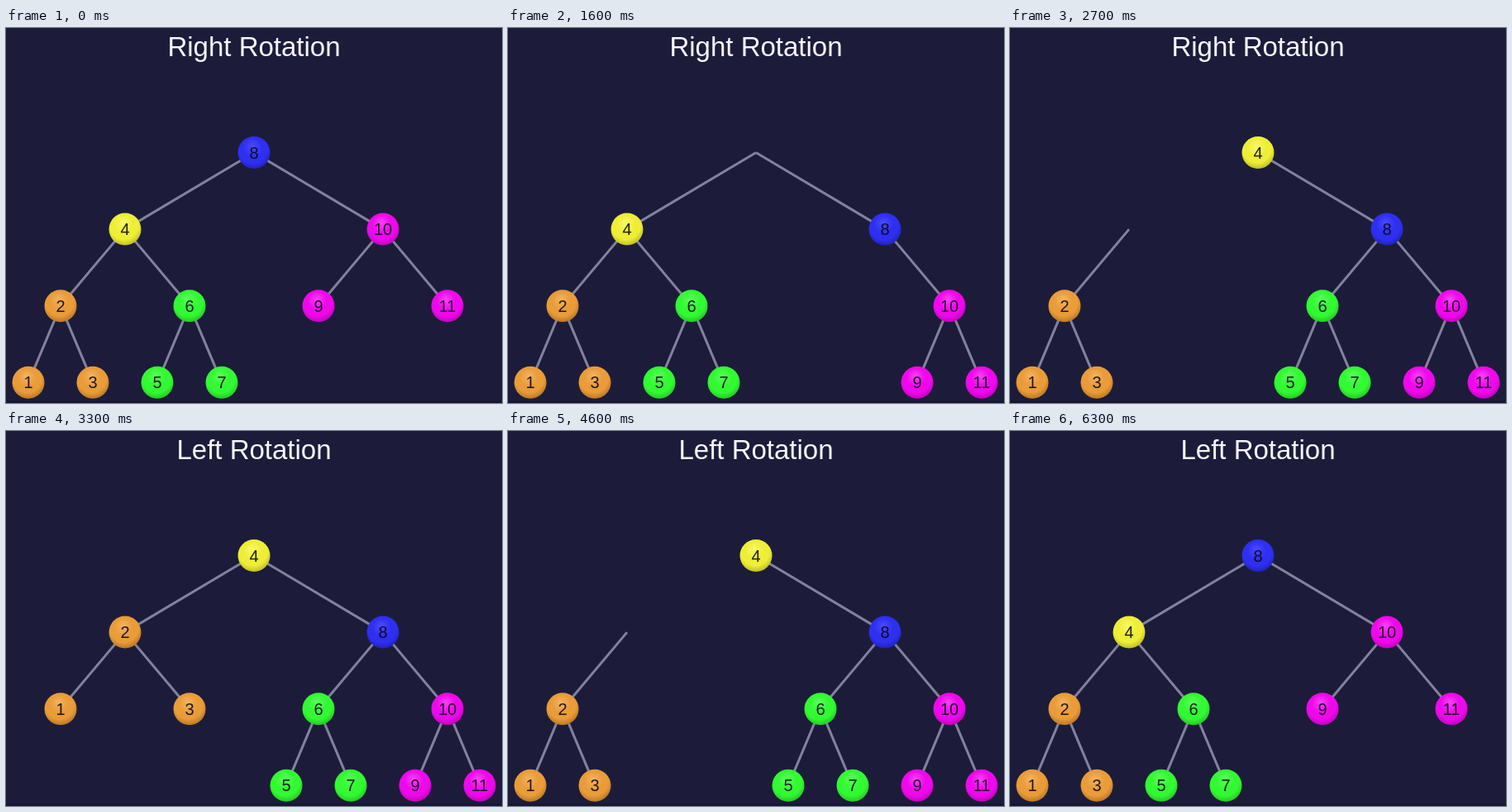
Recreate the animation shown at these times as an HTML page with a canvas. Size 600x453 px, loop 6500 ms.

```html
<!DOCTYPE html>
<html lang="en">
<head>
<meta charset="utf-8">
<title>Tree rotation</title>
<style>
  html, body { margin: 0; width: 100%; height: 100%; overflow: hidden; background: #1c1c3a; }
  canvas { display: block; }
</style>
</head>
<body>
<canvas id="stage" width="600" height="453"></canvas>
<script>
const ctx = document.getElementById("stage").getContext("2d");
const LOOP = 6500;
const RADIUS = 19.5;
const FONT = '"Liberation Sans", Arial, sans-serif';

// Sphere shades: lit top, body, shaded rim
const SHADES = {
  blue: ["#4b4bfa", "#2f2ff2", "#2020b4"],
  yellow: ["#f8f86a", "#eeee37", "#b4b424"],
  orange: ["#f5b363", "#e99c38", "#b07022"],
  green: ["#5cff5c", "#32fa32", "#22be22"],
  pink: ["#fa42f6", "#f008ec", "#b404b2"]
};

const COLORS = {
  1: "orange", 2: "orange", 3: "orange", 4: "yellow",
  5: "green", 6: "green", 7: "green",
  8: "blue", 9: "pink", 10: "pink", 11: "pink"
};

// Trees in heap order; 0 marks an empty slot
const START = [8, 4, 10, 2, 6, 9, 11, 1, 3, 5, 7];
const LOWERED = [0, 4, 8, 2, 6, 0, 10, 1, 3, 5, 7, 0, 0, 9, 11];
const RAISED = [4, 0, 8, 2, 0, 6, 10, 1, 3, 0, 0, 5, 7, 9, 11];
const ROTATED = [4, 2, 8, 1, 3, 6, 10, 0, 0, 0, 0, 5, 7, 9, 11];

const TIMELINE = [
  [0, START], [800, LOWERED], [1900, RAISED], [3000, ROTATED],
  [4000, RAISED], [4700, LOWERED], [5900, START]
];
const TITLE_SWITCH = 3300;

function slotPos(slot) {
  const depth = Math.floor(Math.log2(slot));
  const count = 2 ** depth;
  return {
    x: 300 + 624 * ((slot - count + 0.5) / count - 0.5),
    y: 150.5 + 92.6 * depth
  };
}

function drawText(text, x, y, size, color) {
  ctx.font = `${size}px ${FONT}`;
  ctx.textAlign = "center";
  ctx.fillStyle = color;
  ctx.fillText(text, x, y);
}

function drawEdge(slot) {
  const a = slotPos(slot >> 1);
  const b = slotPos(slot);
  ctx.beginPath();
  ctx.moveTo(a.x, a.y);
  ctx.lineTo(b.x, b.y);
  ctx.stroke();
}

function drawNode(slot, value) {
  const { x, y } = slotPos(slot);
  const [light, body, dark] = SHADES[COLORS[value]];
  const shade = ctx.createRadialGradient(x - 2, y - 8, 0, x - 1, y - 4, 25);
  shade.addColorStop(0, light);
  shade.addColorStop(0.45, body);
  shade.addColorStop(0.7, body);
  shade.addColorStop(1, dark);
  ctx.fillStyle = shade;
  ctx.beginPath();
  ctx.arc(x, y, RADIUS, 0, Math.PI * 2);
  ctx.fill();
  drawText(value, x, y + 7, 20, "rgba(8, 8, 20, 0.9)");
}

function draw(time) {
  const tree = TIMELINE.filter(([start]) => start <= time).pop()[1];
  ctx.fillStyle = "#1c1c3a";
  ctx.fillRect(0, 0, 600, 453);
  ctx.fillStyle = "#171734";
  ctx.fillRect(0, 450, 600, 3);

  ctx.strokeStyle = "#82829c";
  ctx.lineWidth = 3;
  tree.forEach((value, i) => { if (value && i) drawEdge(i + 1); });
  tree.forEach((value, i) => { if (value) drawNode(i + 1, value); });

  const side = time < TITLE_SWITCH ? "Right" : "Left";
  drawText(`${side} Rotation`, 300, 33.5, 33, "#f6f6fa");
}

const begin = performance.now();
function tick() {
  draw((performance.now() - begin) % LOOP);
  requestAnimationFrame(tick);
}
tick();
</script>
</body>
</html>
```
